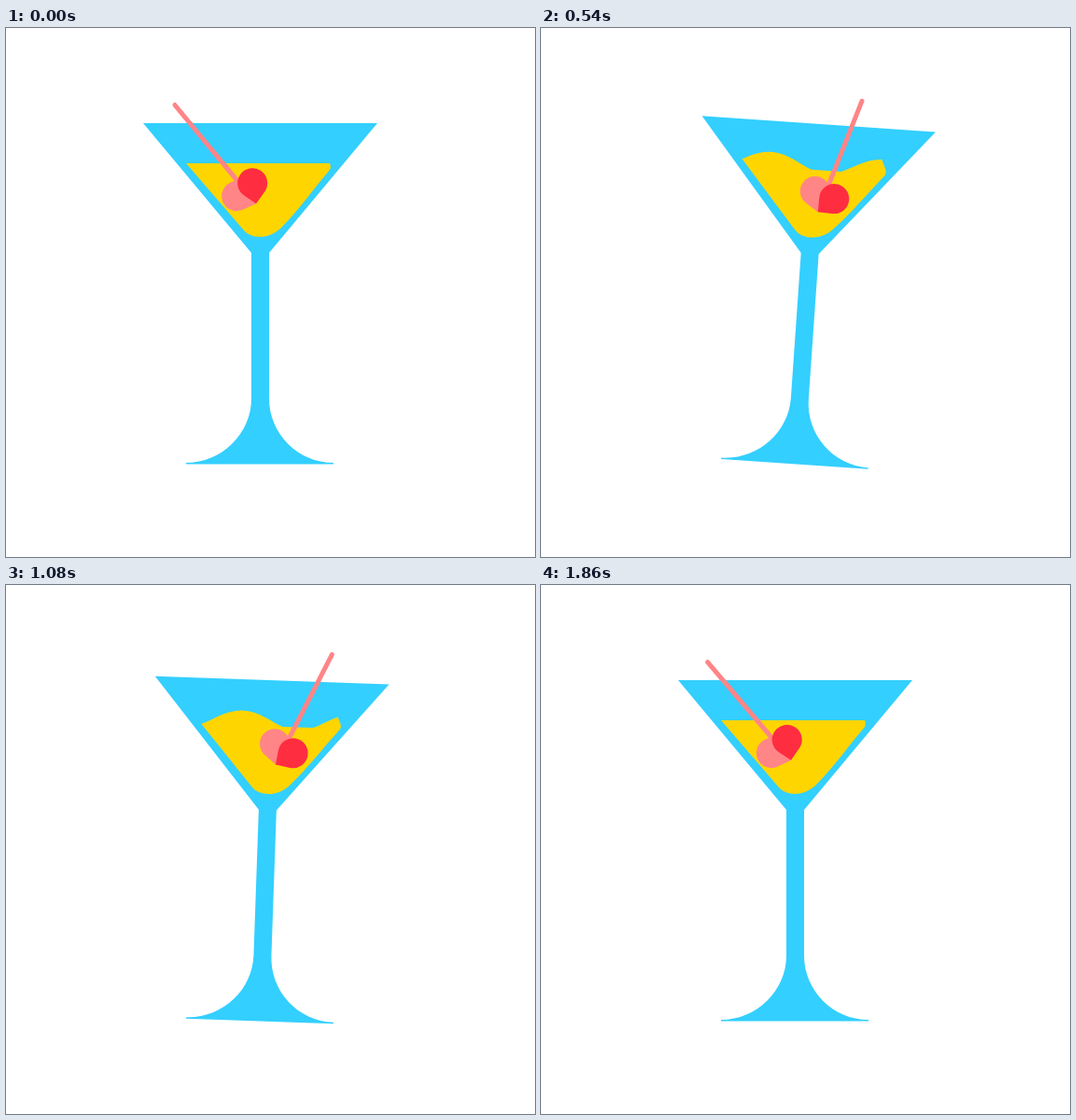
An HTML page with a canvas that plays this animation: 567 px wide and 567 px high, repeating every 1.88 s.

```html
<!DOCTYPE html>
<html lang="en">
<head>
<meta charset="utf-8">
<title>Swaying cocktail</title>
<style>
  html, body { margin: 0; width: 100%; height: 100%; overflow: hidden; background: #fff; }
  canvas { display: block; width: 567px; height: 567px; }
</style>
</head>
<body>
<canvas id="stage" width="567" height="567"></canvas>
<script>
const ctx = document.getElementById("stage").getContext("2d");
const LOOP = 1880;
const PIVOT = [272, 467];
const RAD = Math.PI / 180;

const glass = new Path2D(
  "M147 102H398L282 241V397C282 435 313 466 351 466V467.4H193V466C231 466 263 435 263 397V241Z");
const bowl = new Path2D(
  "M182.8 133L193 145L255 217C263 226.5 283 227 296 213C313 196 330 172 347 152Q348.7 149 347 145L341.5 133Z");

// Each key is [time, value]; values ease in and out between keys.
function ease(t, keys) {
  let i = 1;
  while (i < keys.length - 1 && t > keys[i][0]) i++;
  const [t0, v0] = keys[i - 1], [t1, v1] = keys[i];
  const s = Math.min(1, Math.max(0, (t - t0) / (t1 - t0)));
  return v0 + (v1 - v0) * s * s * (3 - 2 * s);
}

const tilt = [[0, 0], [480, 4], [1680, 0]];
const swell = [[0, 0], [320, 1], [1440, 1], [1840, 0]];
const swing = [[0, -39.5], [840, 41], [1760, -52.5], [1880, -39.5]];
const reach = [[0, 137], [840, 124], [1300, 140], [1880, 138]];

function drawLiquid(t) {
  const amp = ease(t, swell);
  const y = v => 145 + amp * (v - 145);
  const low = y(151.3), mid = y(147), high = y(135.3);
  const crest = 205.6 + 0.0336 * t;
  ctx.save();
  ctx.clip(bowl);
  ctx.beginPath();
  ctx.moveTo(100, 240);
  ctx.lineTo(crest - 164, low);
  for (const c of [crest - 120, crest, crest + 120]) {
    ctx.lineTo(c - 44, low);
    ctx.bezierCurveTo(c - 32, mid, c - 18, high, c, high);
    ctx.bezierCurveTo(c + 18, high, c + 32, mid, c + 44, low);
  }
  ctx.lineTo(460, 240);
  ctx.fillStyle = "#ffd500";
  ctx.fill();
  ctx.restore();
}

function drawLobe(side, color) {
  ctx.save();
  ctx.scale(side, 1);
  ctx.beginPath();
  ctx.moveTo(0, 0);
  ctx.arc(11, -19.5, 16, 163.8 * RAD, 435 * RAD);
  ctx.closePath();
  ctx.fillStyle = color;
  ctx.fill();
  ctx.restore();
}

function drawCherry(t) {
  const angle = ease(t, swing), k = angle / 40;
  const lift = k < 0 ? 13 * (-k) ** 1.3 : 19 * k ** 1.65;
  ctx.save();
  ctx.translate(275 + 7 * k, 201 - lift);
  ctx.rotate(angle * RAD);
  ctx.beginPath();
  ctx.moveTo(0, -ease(t, reach));
  ctx.lineTo(0, -28);
  ctx.lineWidth = 5;
  ctx.lineCap = "round";
  ctx.strokeStyle = "#ff8587";
  ctx.stroke();
  drawLobe(-1, "#ff8587");
  drawLobe(1, "#ff2d40");
  ctx.restore();
}

function draw(now) {
  const t = now % LOOP;
  ctx.fillStyle = "#fff";
  ctx.fillRect(0, 0, 567, 567);
  ctx.save();
  ctx.translate(...PIVOT);
  ctx.rotate(ease(t, tilt) * RAD);
  ctx.translate(-PIVOT[0], -PIVOT[1]);
  ctx.fillStyle = "#33cfff";
  ctx.fill(glass);
  drawLiquid(t);
  drawCherry(t);
  ctx.restore();
}

const start = performance.now();
function tick() {
  draw(performance.now() - start);
  requestAnimationFrame(tick);
}
tick();
</script>
</body>
</html>
```
